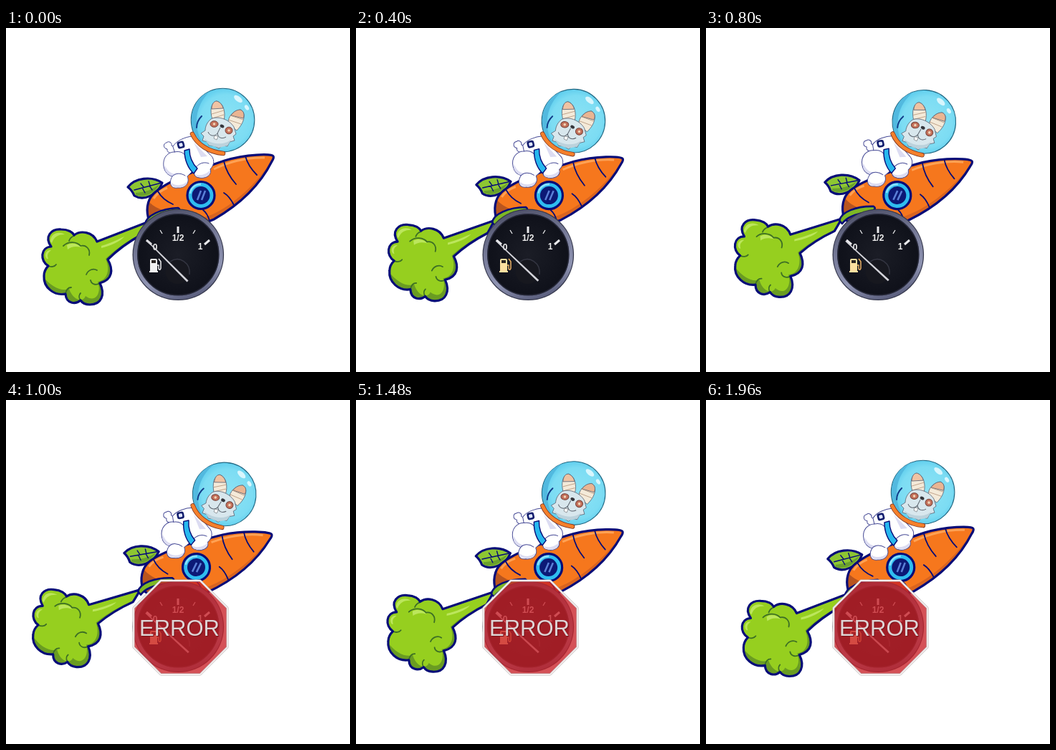
An HTML page that plays this animation: 480 by 480 pixels, repeating every 2000 ms.

```html
<!DOCTYPE html>
<html lang="en">
<head>
<meta charset="utf-8">
<title>Carrot rocket</title>
<style>
  html, body { margin: 0; width: 100%; height: 100%; overflow: hidden; background: #fff; }
  svg { display: block; width: 100vw; height: 100vh; }
  text { font-family: "Liberation Sans", Arial, sans-serif; text-anchor: middle; }
  .ink { stroke: #060c78; stroke-width: 3.2; stroke-linejoin: round; stroke-linecap: round; }
  .thin { stroke: #474b96; stroke-width: 1; stroke-linejoin: round; stroke-linecap: round; }
  .line { fill: none; }
</style>
</head>
<body>
<svg viewBox="0 0 480 480">
  <defs>
    <linearGradient id="bezel" x1=".3" y1="0" x2=".6" y2="1">
      <stop offset="0" stop-color="#50536b"/>
      <stop offset=".4" stop-color="#777b99"/>
      <stop offset=".75" stop-color="#8f94b2"/>
      <stop offset="1" stop-color="#5d6180"/>
    </linearGradient>
    <radialGradient id="dial">
      <stop offset="0" stop-color="#1b1d26"/>
      <stop offset="1" stop-color="#0f111a"/>
    </radialGradient>
    <radialGradient id="glass" cx=".55" cy=".5">
      <stop offset="0" stop-color="#8ce3f5"/>
      <stop offset=".8" stop-color="#7cdcf3"/>
      <stop offset="1" stop-color="#62cfee"/>
    </radialGradient>
    <path id="carrotShape" d="M373 179C371 175 335 176 305 185C270 197 225 213 206 231C196 241 195 256 200 270C215 286 260 281 290 267C325 247 354 220 371 186C373 183 374 181 373 179Z"/>
    <path id="puffShape" d="M63 305C53 291 63 280 77 281C87 281 93 285 95 289C104 282 121 284 127 298L197 271L188 289C170 299 157 308 142 323C150 337 149 351 131 356C139 372 133 386 117 386C109 386 106 383 104 380C97 386 84 385 83 371C67 374 52 362 53 346C53 339 56 335 59 332C47 325 48 306 63 305Z"/>
    <clipPath id="carrotClip"><use href="#carrotShape"/></clipPath>
    <clipPath id="puffClip"><use href="#puffShape"/></clipPath>
  </defs>

  <g id="rocket">
    <!-- leaf -->
    <path class="ink" fill="#8dc632" d="M170 222C180 209 203 206 218 216C212 233 192 242 179 234C177 229 174 225 170 222Z"/>
    <path fill="#6aa02c" d="M181 233C194 238 208 230 214 218C204 226 194 229 181 230Z"/>
    <path class="ink line" style="stroke-width:1.4" d="M179 226L217 216M192 222L188 217M201 220L199 214M190 223L194 230M200 220L204 226"/>

    <!-- stem and puff -->
    <use href="#puffShape" fill="#96cf1f"/>
    <g clip-path="url(#puffClip)">
      <path fill="#6a9c22" d="M48 342C62 362 78 368 88 364C94 381 108 383 111 374C124 384 134 371 128 354C141 352 146 338 139 322C153 309 168 297 196 283L200 300L150 400H48Z"/>
      <path fill="#bce65c" d="M62 298C62 287 73 283 82 288C73 288 67 291 64 300ZM57 322C52 316 57 309 63 310C58 314 57 317 59 322ZM85 303C92 299 100 301 105 306C97 304 91 305 86 309ZM133 304C147 300 158 294 165 291C160 298 145 304 133 307Z"/>
    </g>
    <path class="line" stroke="#3d6f25" stroke-width="1.8" stroke-linecap="round" d="M80 304C87 297 99 298 104 304C112 302 118 309 116 317M95 290C92 291 89 294 88 297M59 332C63 334 68 333 70 330M83 371C84 365 87 362 91 362M104 380C101 376 102 372 104 370M131 356C125 360 119 357 118 352M112 344C115 337 122 335 127 338"/>
    <use href="#puffShape" class="ink line"/>

    <!-- carrot -->
    <use href="#carrotShape" fill="#f6771d"/>
    <g clip-path="url(#carrotClip)">
      <path fill="#d9641f" d="M373 182C350 217 318 247 286 261C256 271 222 270 194 250V292H300L380 220Z"/>
      <path fill="#b9551f" d="M196 238C204 250 220 257 240 258L236 290H194Z"/>
      <path class="line" stroke="#ffa254" stroke-width="3" d="M361 181C335 180 308 188 290 197M225 223C215 227 209 233 206 238"/>
      <path class="ink line" style="stroke-width:1.8" d="M304 186C307 200 313 209 321 218M334 179C337 190 342 197 350 205M318 247C314 239 309 233 304 230M212 228C217 237 224 242 233 246M284 269C282 262 279 257 275 254"/>
    </g>
    <use href="#carrotShape" class="ink line"/>
    <path class="ink" style="stroke-width:2.6" fill="#7db825" d="M194 274C195 262 216 252 240 251C246 254 239 258 232 260C216 263 204 268 198 278Z"/>

    <!-- porthole -->
    <circle class="ink" cx="272" cy="233.500" r="19" fill="#2fbdf0"/>
    <path class="line" stroke="#8ce2fc" stroke-width="2.500" d="M257 231C258 223 264 218 272 218"/>
    <circle cx="272" cy="233.500" r="12.500" fill="#0c1976"/>
    <path stroke="#5b80d8" stroke-width="2.500" d="M267 240L272 227M273 240L278 227"/>

    <!-- astronaut suit -->
    <path class="thin" fill="#fff" d="M234 174C229 176 224 173 225 169C219 168 219 161 224 160C227 157 232 160 231 164L238 168Z"/>
    <path class="thin" fill="#fff" d="M233 165C238 157 250 152 260 151L284 176C292 182 291 191 285 197C288 206 277 212 266 208C262 206 262 201 264 196L253 207C257 216 250 224 240 223C229 225 227 215 232 207C219 204 217 187 223 179C227 174 231 173 235 173Z"/>
    <path fill="#dcdcf2" d="M222 192C226 201 232 205 240 203L233 207C224 204 220 199 222 192ZM264 204C271 207 280 204 285 198C286 206 276 211 266 207ZM231 216C237 221 247 220 253 214C252 221 246 223 239 222C233 222 231 220 231 216ZM262 160L281 179L272 180Z"/>
    <path class="thin line" d="M235 173C244 171 249 175 252 180M264 196C268 189 276 186 283 189M232 207C236 202 244 202 250 206"/>
    <path class="ink" style="stroke-width:1.400" fill="#27b8ee" d="M249 171L256 169C256 180 260 189 267 196L262 203C254 196 249 184 249 171Z"/>
    <rect x="239" y="158" width="10" height="10" rx="3" fill="#111c6c" transform="rotate(-15 244 163)"/>
    <rect x="241.500" y="160.500" width="5" height="5" rx="1.500" fill="#dfe6ff" transform="rotate(-15 244 163)"/>

    <!-- helmet and head -->
    <circle cx="302.500" cy="128.500" r="44.300" fill="url(#glass)" stroke="#226883" stroke-width="1.100"/>
    <path fill="#52b9df" d="M285 88C266 96 256 115 260 138C263 147 267 154 274 160C261 138 263 108 285 88Z"/>
    <g stroke="#576071" stroke-width=".8" stroke-linejoin="round">
      <path fill="#f4ead9" d="M288 128C284 115 286 104 294 102C303 104 307 117 304 129Z"/>
      <path fill="#f0c3a3" d="M287 113C287 106 290 102 294 102C298 103 302 107 303 112Z"/>
      <path fill="#f4ead9" d="M310 134C309 124 317 115 327 114C335 117 334 131 322 143Z"/>
      <path fill="#eab592" d="M314 122C317 117 322 114 327 114C332 116 333 121 331 126Z"/>
      <path class="line" stroke="#b49378" d="M287 120L304 115M288 126L304 121M310 128L328 134M313 122L331 128"/>
      <path fill="#d8e7ed" d="M286 127C295 122 311 127 318 138L321 148L317 151L319 157L312 159L309 165L302 164L297 168L290 164L283 164L281 159L274 157L276 151L272 147L278 143C278 137 281 131 286 127Z"/>
    </g>
    <path fill="#bcd2dc" d="M276 154C286 162 304 165 315 155L309 164L297 167L283 163Z"/>
    <g fill="#c4705a" stroke="#754137" stroke-width="1">
      <ellipse cx="290.500" cy="134" rx="5.500" ry="4.300"/>
      <ellipse cx="311" cy="143" rx="5" ry="4.800"/>
    </g>
    <g fill="#f0d4b6"><circle cx="290.500" cy="134" r="1.800"/><circle cx="311" cy="143" r="1.800"/></g>
    <ellipse cx="301.500" cy="137" rx="3" ry="2.200" fill="#34353b" transform="rotate(25 301.500 137)"/>
    <path class="line" stroke="#59616b" stroke-width="1" d="M299 139L295 147M282 145C284 151 291 152 295 147C296 154 302 155 307 152"/>
    <path fill="#fff" stroke="#6e7377" stroke-width=".7" d="M291 150L296 151L294 156L290 154Z"/>
    <g fill="#d8f6fd">
      <ellipse cx="324" cy="99" rx="7" ry="3.500" transform="rotate(38 324 99)"/>
      <ellipse cx="336" cy="111" rx="4" ry="2.500" transform="rotate(55 336 111)"/>
    </g>
    <path class="line" stroke="#123b89" stroke-width="2" stroke-linecap="round" d="M266 139C266 133 269 127 273 123"/>
    <g class="line" stroke-linecap="round">
      <path stroke="#803b2a" stroke-width="6.500" d="M260 148C267 163 283 173 303 175"/>
      <path stroke="#f5802b" stroke-width="4.800" d="M260 148C267 163 283 173 303 175"/>
    </g>
  </g>

  <!-- fuel gauge -->
  <circle cx="240.300" cy="316.300" r="63.800" fill="#33364a"/>
  <circle cx="240.300" cy="316.300" r="59.800" fill="none" stroke="url(#bezel)" stroke-width="5.500"/>
  <circle cx="240.300" cy="316.300" r="56.500" fill="url(#dial)" stroke="#262838" stroke-width="1.500"/>
  <g stroke="#e9e9ec">
    <path stroke-width="3" d="M240 277V286M284 296L277 302M196 296L203 302"/>
    <path stroke-width="1.300" d="M215 282L218 287M264 282L261 287"/>
  </g>
  <g fill="#eee" font-weight="700" font-size="12">
    <text x="240" y="297">1/2</text>
    <text x="208" y="310">0</text>
    <text x="271" y="309">1</text>
  </g>
  <circle cx="239.500" cy="340" r="17" fill="#17181f"/>
  <path class="line" stroke="#343642" stroke-width="1.500" d="M229 326C242 317 258 328 256 344"/>
  <g id="pump">
    <path d="M201 339V324Q201 322 203 322H209Q211 322 211 324V339H212V341H200V339Z"/>
    <rect x="203" y="324" width="6" height="4" fill="#2a2421"/>
    <path class="line" stroke="currentColor" stroke-width="1.500" d="M211 331H213V336Q215 339 216 335V326L213 322"/>
  </g>
  <path id="needle" fill="#d4d4da" d="M195.500 296.500L196.500 295.500L254.500 352.500L252.500 354.500Z"/>

  <!-- error sign -->
  <g id="sign">
    <path fill="#c82028" fill-opacity=".78" stroke="#bbb" stroke-width="3" stroke-linejoin="round" d="M216 252H271L309 290V345L271 383H216L178 345V290Z"/>
    <path fill="none" stroke="#f5eeee" stroke-width="1.800" d="M216 252H271L309 290V345L271 383H216L178 345V290Z"/>
    <text x="243" y="330" font-size="31" fill="#741116">ERROR</text>
    <text x="242" y="329" font-size="31" fill="#dfd5d6">ERROR</text>
  </g>
</svg>
<script>
  const [rocket, pump, needle, sign] =
    ["rocket", "pump", "needle", "sign"].map(id => document.getElementById(id));

  function draw(now) {
    const t = Math.floor(now % 2000 / 40) * 40;

    // Linear swing out and back around the rider.
    const swing = 1 - Math.abs(t / 1000 - 1);
    rocket.setAttribute("transform", `rotate(${4.8 * swing} 268 156)`);

    const lit = t >= 200;
    pump.setAttribute("fill", lit ? "#ffe0a0" : "#f2f2f2");
    pump.setAttribute("color", lit ? "#eeb467" : "#f2f2f2");
    needle.setAttribute("transform", `rotate(${-2.5 * Math.min(t / 600, 1)} 225 325)`);
    sign.setAttribute("visibility", t % 400 >= 200 ? "visible" : "hidden");
  }

  function loop() {
    draw(performance.now());
    requestAnimationFrame(loop);
  }
  loop();
</script>
</body>
</html>
```
